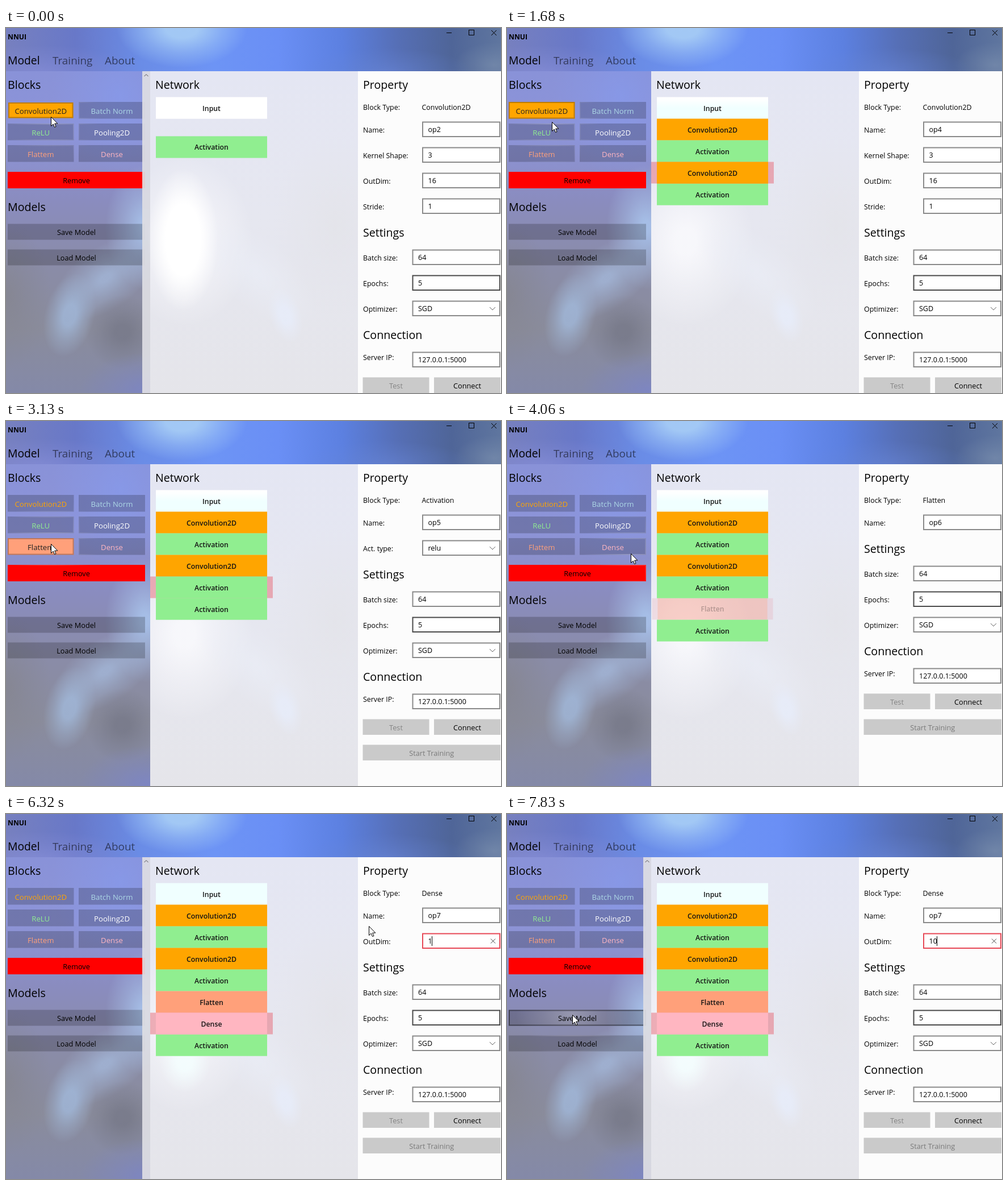
Recreate the animation shown at these times as an HTML page with a canvas. Size 872 by 642 pixels, loop 8 s.

```html
<!DOCTYPE html>
<html lang="en">
<head>
<meta charset="utf-8">
<title>NNUI</title>
<style>
html, body { margin: 0; width: 100%; height: 100%; overflow: hidden; background: #fcfcfc; }
canvas { display: block; width: 872px; height: 642px; }
</style>
</head>
<body>
<canvas id="stage" width="872" height="642"></canvas>
<script>
const W = 872, H = 642, LOOP = 8000;
const ctx = document.getElementById('stage').getContext('2d');
const FONT = '"Open Sans", "Noto Sans", sans-serif';
const ORANGE = '#ffa500', GREEN = '#90ee90', SALMON = '#ffa07a', PINK = '#ffb6c1', RED = '#e74856';

// Blocks in order of insertion; each one lands just above the last activation.
const inserts = [
  { at: -170, label: 'Convolution2D', color: ORANGE },
  { at: 100, label: 'Activation', color: GREEN },
  { at: 1020, label: 'Convolution2D', color: ORANGE },
  { at: 2400, label: 'Activation', color: GREEN },
  { at: 3620, label: 'Flatten', color: SALMON },
  { at: 4430, label: 'Dense', color: PINK }
];

const blocks = [
  { label: 'Convolution2D', color: ORANGE, hover: [[0, 70], [960, 1745]] },
  { label: 'Batch Norm', color: '#add8e6', hover: [] },
  { label: 'ReLU', color: GREEN, hover: [[90, 920], [1770, 2900]] },
  { label: 'Pooling2D', color: '#ffffff', hover: [] },
  { label: 'Flattem', color: SALMON, hover: [[2980, 3850]] },
  { label: 'Dense', color: PINK, hover: [[4110, 4600]] }
];

// time, x, y of the pointer tip
const path = [
  [0, 79, 156], [40, 79, 156], [100, 73, 182], [160, 72, 185], [880, 72, 185],
  [1000, 78, 150], [1500, 78, 150], [1680, 79, 165], [1730, 79, 165], [1790, 79, 178],
  [2740, 79, 178], [3100, 79, 216], [3720, 79, 216], [4060, 218, 233], [4290, 207, 227],
  [4480, 207, 227], [5180, 768, 224], [5220, 768, 224], [5640, 639, 197],
  [7430, 639, 197], [7830, 115, 353], [8000, 115, 353]
];

const clamp = v => Math.max(0, Math.min(1, v));
const ramp = (t, a, b) => clamp((t - a) / (b - a));
const easeOut = u => 1 - (1 - u) ** 3;
const smooth = u => u * u * (3 - 2 * u);
const within = (t, spans) => spans.some(([a, b]) => t >= a && t < b);

function pointerAt(t) {
  let i = 1;
  while (i < path.length - 1 && path[i][0] < t) i++;
  const [t0, x0, y0] = path[i - 1], [t1, x1, y1] = path[i];
  const u = smooth(ramp(t, t0, t1));
  return { x: x0 + (x1 - x0) * u, y: y0 + (y1 - y0) * u };
}

function rect(x, y, w, h, fill, c = ctx) {
  c.fillStyle = fill;
  c.fillRect(x, y, w, h);
}

function frame(x, y, w, h, color, line = 2) {
  ctx.strokeStyle = color;
  ctx.lineWidth = line;
  ctx.strokeRect(x + line / 2, y + line / 2, w - line, h - line);
}

function text(s, x, y, size, color = '#000', align = 'left', weight = 400) {
  ctx.font = `${weight} ${size}px ${FONT}`;
  ctx.textAlign = align;
  ctx.fillStyle = color;
  ctx.fillText(s, x, y);
}

function line(points, color, width = 1) {
  ctx.beginPath();
  points.forEach(([x, y], i) => i ? ctx.lineTo(x, y) : ctx.moveTo(x, y));
  ctx.strokeStyle = color;
  ctx.lineWidth = width;
  ctx.stroke();
}

function glow(c, x, y, rx, ry, rgb, alpha, core = 0, turn = 0) {
  c.save();
  c.translate(x, y);
  c.rotate(turn);
  c.scale(rx, ry);
  const g = c.createRadialGradient(0, 0, 0, 0, 0, 1);
  g.addColorStop(0, `rgba(${rgb},${alpha})`);
  g.addColorStop(core, `rgba(${rgb},${alpha})`);
  g.addColorStop(core + (1 - core) / 2, `rgba(${rgb},${alpha * 0.45})`);
  g.addColorStop(1, `rgba(${rgb},0)`);
  c.fillStyle = g;
  c.fillRect(-1, -1, 2, 2);
  c.restore();
}

function blend(c, x0, y0, x1, y1, stops) {
  const g = c.createLinearGradient(x0, y0, x1, y1);
  stops.forEach(([p, color]) => g.addColorStop(p, color));
  return g;
}

function clipped(c, x, y, w, h, draw) {
  c.save();
  c.beginPath();
  c.rect(x, y, w, h);
  c.clip();
  draw();
  c.restore();
}

// The blurred backdrop never changes, so it is painted once.
const backdrop = document.createElement('canvas');
backdrop.width = W;
backdrop.height = H;
(function paintBackdrop(c) {
  clipped(c, 0, 0, W, 76, () => {
    rect(0, 0, W, 76, blend(c, 0, 0, W, 0, [
      [0, '#7780bf'], [0.14, '#6878c8'], [0.27, '#6a8ce6'], [0.42, '#6d94f5'],
      [0.55, '#6a8ff5'], [0.68, '#5c80e0'], [0.79, '#566fb6'], [0.9, '#4f6598'], [1, '#5f769f']
    ]), c);
    glow(c, 310, 0, 115, 70, '165,203,245', 0.95, 0.25);
    glow(c, 60, 80, 180, 50, '140,146,220', 0.6);
    glow(c, 860, 65, 70, 40, '125,145,175', 0.6);
    glow(c, 670, 75, 150, 40, '105,135,215', 0.5);
  });
  clipped(c, 0, 76, 254, H - 76, () => {
    rect(0, 76, 254, H - 76, blend(c, 0, 76, 0, H, [
      [0, '#8992d8'], [0.2, '#8d94d8'], [0.4, '#8a8cbf'], [0.6, '#8a8ca8'], [0.8, '#8a8c9c'], [1, '#8489a8']
    ]), c);
    glow(c, 200, 120, 120, 140, '133,155,240', 0.6);
    glow(c, 245, 350, 70, 110, '170,198,238', 0.85, 0.1);
    glow(c, 175, 440, 105, 55, '165,186,220', 0.75, 0.1, -0.6);
    glow(c, 112, 505, 44, 75, '160,182,215', 0.85, 0.25, 0.25);
    glow(c, 205, 535, 65, 65, '118,120,136', 0.8, 0.2);
    glow(c, 250, 640, 120, 70, '122,132,205', 0.7);
    glow(c, 0, 470, 80, 130, '132,132,140', 0.7);
  });
  clipped(c, 254, 76, 366, H - 76, () => {
    rect(254, 76, 366, H - 76, blend(c, 0, 76, 0, H, [
      [0, '#e4e6f3'], [0.45, '#e6e7f0'], [1, '#e5e5ea']
    ]), c);
    glow(c, 315, 375, 120, 150, '250,250,253', 0.85, 0.15);
    glow(c, 440, 430, 130, 60, '234,237,246', 0.7, 0.1, 0.7);
    glow(c, 492, 505, 28, 50, '231,236,249', 0.9, 0.3, -0.3);
    glow(c, 580, 350, 110, 160, '227,227,232', 0.7);
  });
  rect(620, 76, 252, H - 76, '#fcfcfc', c);
})(backdrop.getContext('2d'));

function drawHeader() {
  text('NNUI', 3, 20, 12.2, '#000', 'left', 700);
  text('Model', 3, 64, 19.3);
  text('Training', 82, 64, 18.9, 'rgba(0,0,0,.55)');
  text('About', 174, 64, 18.9, 'rgba(0,0,0,.55)');
  line([[776, 8.5], [785, 8.5]], '#000');
  frame(815, 3, 10, 10, '#000', 1);
  line([[855, 4], [864, 13]], '#000');
  line([[864, 4], [855, 13]], '#000');
}

// Light that follows the pointer along the edges of nearby buttons.
function reveal(x, y, w, h, p) {
  const g = ctx.createRadialGradient(p.x, p.y, 0, p.x, p.y, 85);
  g.addColorStop(0, 'rgba(255,255,255,.28)');
  g.addColorStop(1, 'rgba(255,255,255,0)');
  frame(x, y, w, h, g, 1.5);
}

function drawBlock(b, i, t, p) {
  const col = i % 2, x = col ? 128 : 3, y = 130 + 38 * (i >> 1), w = col ? 117 : 116.5;
  const hot = within(t, b.hover);
  if (hot) {
    const pressed = inserts.some(n => t >= n.at && t < n.at + 655 && n.at < 1000);
    const d = pressed ? 1 : 0;
    rect(x + d, y + d, w - 2 * d, 29.5 - 2 * d, b.color);
    frame(x + d, y + d, w - 2 * d, 29.5 - 2 * d, 'rgba(0,0,0,.25)');
  } else {
    rect(x, y, w, 29.5, 'rgba(0,0,0,.2)');
    reveal(x, y, w, 29.5, p);
  }
  text(b.label, x + w / 2, y + 20.5, 13.2, hot ? '#222' : b.color, 'center');
}

function drawWide(label, y, h, fill, p, hot) {
  rect(3, y, 242, h, fill);
  if (hot) {
    clipped(ctx, 3, y, 242, h, () => glow(ctx, p.x, p.y, 100, 60, '255,255,255', 0.28));
    frame(3, y, 242, h, 'rgba(0,0,0,.42)');
  } else {
    reveal(3, y, 242, h, p);
  }
  text(label, 124, y + h / 2 + 5, 12.7, '#000', 'center');
}

function drawScrollbar(t) {
  const shown = t < 3000 ? 1 - ramp(t, 1100, 1300)
    : t < 6000 ? ramp(t, 4560, 4720)
    : t < 7000 ? 1 - ramp(t, 6600, 6810)
    : ramp(t, 7460, 7620);
  if (!shown) return;
  ctx.globalAlpha = shown;
  rect(240, 76, 14, H - 76, 'rgba(222,222,228,.93)');
  line([[243.5, 85], [247, 81.5], [250.5, 85]], '#555');
  ctx.globalAlpha = 1;
}

function drawLeft(t, p) {
  text('Blocks', 3, 107, 19.6);
  blocks.forEach((b, i) => drawBlock(b, i, t, p));
  drawWide('Remove', 253, 29, '#ff0000', p);
  text('Models', 3, 322, 19.6);
  drawWide('Save Model', 344.5, 28, 'rgba(0,0,0,.2)', p, t > 7770);
  drawWide('Load Model', 389.5, 28, 'rgba(0,0,0,.2)', p);
  drawScrollbar(t);
}

function drawItem(label, row, fill) {
  const y = 121.5 + 38 * row;
  rect(264, y, 196, 38.2, fill);
  text(label, 362, y + 24, 12.3, '#141414', 'center', 600);
}

function drawNetwork(t) {
  glow(ctx, 312, 372, 62, 125, '255,255,255', 1 - ramp(t, 40, 300), 0.5);
  glow(ctx, 315, 435, 45, 55, '244,255,255', 0.8 * ramp(t, 4500, 4900), 0.3);
  text('Network', 263, 107, 19.6);
  const inputFill = t < 40 ? '#fff' : t > 4700 ? '#f0ffff'
    : blend(ctx, 0, 121, 0, 141, [[0, '#fff'], [0.3, '#fdffff'], [1, '#f0ffff']]);
  drawItem('Input', 0, inputFill);

  const tail = inserts.reduce((sum, n) => sum + easeOut(ramp(t, n.at, n.at + 400)), 1);
  const selected = inserts.filter(n => t >= n.at).length - 1;
  drawItem('Activation', tail, GREEN);
  inserts.forEach((n, i) => {
    const u = ramp(t, n.at + 300, n.at + 640) ** 1.4;
    if (!u) return;
    const k = 0.98 + 0.02 * u, cy = 140.5 + 38 * (i + 1);
    ctx.save();
    ctx.globalAlpha = u;
    ctx.translate(362, cy);
    ctx.scale(k, k);
    ctx.translate(-362, -cy);
    if (i === selected) rect(254, cy - 19, 216, 38, 'rgba(231,72,86,.4)');
    drawItem(n.label, i + 1, n.color);
    ctx.restore();
  });
}

function field(x, y, value, color = '#8a8a8a', drop = false) {
  rect(x, y, 871 - x, 27.5, '#fff');
  frame(x, y, 871 - x, 27.5, color);
  text(value, x + 10.5, y + 18.5, 12.5);
  if (drop) line([[852, y + 11.5], [857, y + 16.5], [862, y + 11.5]], '#666');
}

function row(label, y, x, value, color, drop) {
  text(label, 629, y + 4.7, 12.4);
  field(x, y - 14.5, value, color, drop);
}

function button(label, x, y, w, color) {
  rect(x, y, w, 27.5, '#cacaca');
  text(label, x + w / 2, y + 19, 12.7, color, 'center');
}

function drawOutDim(t, y) {
  const focused = t >= 5220;
  const value = t < 6320 ? '16' : t < 6600 ? '1' : '10';
  row('OutDim:', y, 733, value, focused ? RED : '#8a8a8a');
  if (!focused) return;
  line([[854, y - 4.5], [862, y + 3.5]], '#444');
  line([[862, y - 4.5], [854, y + 3.5]], '#444');
  if (t < 6320) {
    const w = t < 5300 ? 0 : t < 5360 ? 7.2 : 14.5;
    clipped(ctx, 743.5, y - 9.5, w, 17, () => {
      rect(743, y - 10, 16, 18, RED);
      text(value, 743.5, y + 4, 12.5, '#fff');
    });
  } else {
    rect(value === '1' ? 750 : 757, y - 9, 1, 17, '#000');
  }
}

function drawProperty(t) {
  const k = inserts.filter(n => t >= n.at + 60).length - 1;
  const type = inserts[k].label;
  text('Property', 629, 107, 19.6);
  text('Block Type:', 629, 143.7, 12.4);
  text(type, 732.5, 143.7, 12.4);
  row('Name:', 179, 733, 'op' + (k + 2));

  let extra = 0;
  if (type === 'Convolution2D') {
    row('Kernel Shape:', 224, 733, '3');
    row('OutDim:', 269, 733, '16');
    row('Stride:', 314, 733, '1');
    extra = 3;
  } else if (type === 'Activation') {
    row('Act. type:', 224, 733, 'relu', undefined, true);
    extra = 1;
  } else if (type === 'Dense') {
    drawOutDim(t, 224);
    extra = 1;
  }

  const y = 225 + 45 * extra;
  text('Settings', 629, y + 7, 19.6);
  row('Batch size:', y + 44, 715.5, '64');
  row('Epochs:', y + 89, 715.5, '5', '#4a4a4a');
  row('Optimizer:', y + 134, 715.5, 'SGD', undefined, true);
  text('Connection', 629, y + 187, 19.6);
  text('Server IP:', 629, y + 223.5, 12.4);
  field(715.5, y + 209.5, '127.0.0.1:5000');
  button('Test', 628.5, y + 254.5, 117, '#858585');
  button('Connect', 754, y + 254.5, 117, '#000');
  button('Start Training', 628.5, y + 299.5, 242.5, '#7a7a7a');
}

function drawPointer(t, p) {
  ctx.save();
  ctx.translate(Math.round(p.x) + 0.5, Math.round(p.y) + 0.5);
  if (t > 5100 && t < 5600 && p.x > 733) {
    line([[-3, -8], [3, -8]], '#000');
    line([[0, -8], [0, 8]], '#000');
    line([[-3, 8], [3, 8]], '#000');
  } else {
    ctx.beginPath();
    [[0, 0], [0, 16], [3.7, 12.5], [6, 18], [8.5, 17], [6.2, 11.6], [11.3, 11.6]]
      .forEach(([x, y], i) => i ? ctx.lineTo(x, y) : ctx.moveTo(x, y));
    ctx.closePath();
    ctx.fillStyle = '#fff';
    ctx.fill();
    ctx.strokeStyle = '#000';
    ctx.lineWidth = 1;
    ctx.stroke();
  }
  ctx.restore();
}

function draw(t) {
  const p = pointerAt(t);
  ctx.drawImage(backdrop, 0, 0);
  drawHeader();
  drawLeft(t, p);
  drawNetwork(t);
  drawProperty(t);
  drawPointer(t, p);
}

const start = performance.now();
function tick() {
  draw((performance.now() - start) % LOOP);
  requestAnimationFrame(tick);
}
tick();
</script>
</body>
</html>
```
